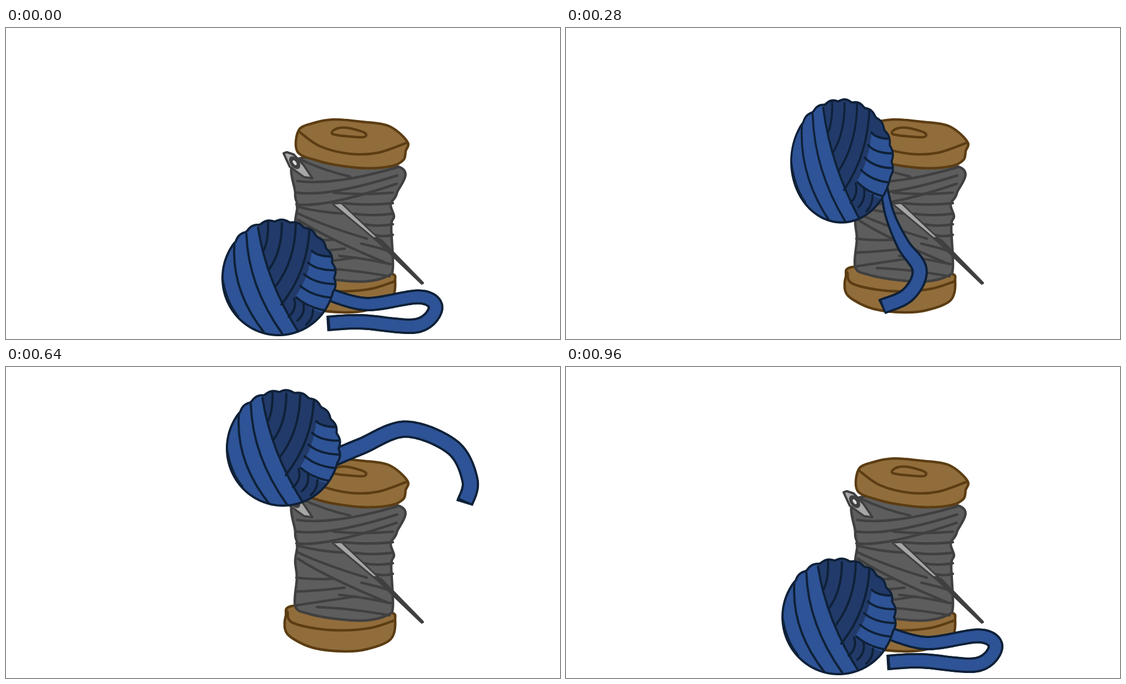
Recreate the animation shown at these times as an HTML page with a canvas. Size 998 px wide and 561 px high, loop 1 s.

```html
<!DOCTYPE html>
<html>
<head>
<meta charset="utf-8">
<style>
html, body { margin: 0; width: 100%; height: 100%; overflow: hidden; background: #fff; }
canvas { display: block; }
</style>
</head>
<body>
<canvas id="stage" width="998" height="561"></canvas>
<script>
const ctx = document.getElementById('stage').getContext('2d');
const LOOP = 1000, STEP = 40, SAMPLES = 80;
const BROWN = '#916d3b', BROWN_INK = '#5c3d13';
const GREY = '#5d5d5d', GREY_INK = '#404040', STEEL = '#a7a7a7';
const BLUE = '#2e5396', NAVY = '#213a69', BLUE_INK = '#0f2138';

const mix = (a, b, k) => a + (b - a) * k;
const points = text => text.split(' ').map(p => p.split(',').map(Number));

// Smooth path through every point
function curve(text, closed) {
  const p = points(text), n = p.length, path = new Path2D();
  const at = i => closed ? p[(i + n) % n] : p[Math.max(0, Math.min(n - 1, i))];
  path.moveTo(...p[0]);
  for (let i = 0; i < (closed ? n : n - 1); i++) {
    const [a, b, c, d] = [at(i - 1), at(i), at(i + 1), at(i + 2)];
    path.bezierCurveTo(b[0] + (c[0] - a[0]) / 6, b[1] + (c[1] - a[1]) / 6,
      c[0] - (d[0] - b[0]) / 6, c[1] - (d[1] - b[1]) / 6, ...c);
  }
  if (closed) path.closePath();
  return path;
}

// Even samples along the same kind of curve
function sample(text) {
  const p = points(text), n = p.length;
  const at = i => p[Math.max(0, Math.min(n - 1, i))];
  return Array.from({ length: SAMPLES + 1 }, (_, s) => {
    const u = s / SAMPLES * (n - 1), i = Math.min(n - 2, Math.floor(u)), k = u - i;
    return [0, 1].map(j => {
      const [a, b, c, d] = [at(i - 1)[j], at(i)[j], at(i + 1)[j], at(i + 2)[j]];
      return b + .5 * k * (c - a + k * (2 * a - 5 * b + 4 * c - d + k * (3 * (b - c) + d - a)));
    });
  });
}

// A family of bent lines: start, bend and end each move by a fixed step [x, y, dx, dy]
function sweep(count, ...knots) {
  const path = new Path2D();
  for (let i = 0; i < count; i++) {
    const [a, b, c] = knots.map(([x, y, dx = 0, dy = 0]) => [x + dx * i, y + dy * i]);
    path.moveTo(...a);
    path.quadraticCurveTo(...b, ...c);
  }
  return path;
}

function paint(path, fill, ink, width = 4.5) {
  if (fill) { ctx.fillStyle = fill; ctx.fill(path); }
  if (ink) { ctx.strokeStyle = ink; ctx.lineWidth = width; ctx.stroke(path); }
}

const spool = {
  base: curve('516,431 504,449 503,474 517,490 555,507 610,513 650,509 693,491 701,455 690,442 610,430', true),
  baseRim: curve('507,441 514,460 560,472 610,475 660,470 700,457'),
  body: curve('530,235 521,298 525,320 521,350 524,380 521,431 545,445 600,455 650,457 688,447 697,431 694,357 699,340 693,318 704,298 707,250', true),
  wraps: [
    sweep(1, [532, 238], [575, 258], [620, 268]),
    sweep(3, [525, 276, -1, 21], [590, 285, -8, 20], [706, 251, -1, 15]),
    sweep(5, [590, 297, 18, 19], [640, 302, 10, 19], [697, 297, 0, 19]),
    sweep(3, [524, 322, 1, 12], [565, 333, 8, 24], [612, 335, 38, 45]),
    sweep(3, [523, 380, 0, 25], [560, 384, 0, 20], [590, 382, 20, 16]),
    sweep(3, [640, 389, -40, 22], [668, 395, -25, 20], [695, 404, -2, 22])
  ],
  top: curve('527,185 552,172 590,165 640,169 690,177 723,205 720,222 716,238 695,249 650,253 600,248 560,239 525,223', true),
  topRim: curve('527,186 565,213 620,227 670,225 722,207'),
  hole: curve('587,188 597,181 615,180 646,189 642,197 595,193', true)
};

const needle = {
  head: new Path2D('M500 226L506 224L518 228L536 247L552 271L537 269L511 250Z'),
  shaft: new Path2D('M588 317L604 316L680 388L668 384Z'),
  tip: new Path2D('M664 379L676 383L751 460L749 461L705 419Z')
};

// Circle with the ends of the yarn bulging out over the top right
function ballEdge() {
  const path = new Path2D();
  for (let d = -140; d < 220; d += 2) {
    const a = d * Math.PI / 180;
    const bump = d < 15 ? 3.5 * Math.abs(Math.sin(11.5 * a)) - 1 : 0;
    path.lineTo(491 + (101 + bump) * Math.cos(a), 451 + (103 + bump) * Math.sin(a));
  }
  path.closePath();
  return path;
}

const ball = {
  edge: ballEdge(),
  left: new Path2D('M454 345V360Q469 458 529 552V570H380V345Z'),
  right: new Path2D('M551 402Q563 414 600 412V515H578Q546 510 522 484Q546 450 551 402Z'),
  seams: [
    sweep(1, [390, 452], [397, 495], [418, 520]),
    sweep(3, [412, 382, 21, -11], [403, 472, 33, -7], [467, 552, 31, 0]),
    sweep(4, [472, 350, 25, 2], [473, 386, 24, 17], [463, 403, 11, 32]),
    sweep(5, [551, 402, -7, 21], [563, 414, -3, 24], [597, 412, 0, 25]),
    sweep(3, [519, 488, 17, 10], [525, 507, 14, 9], [509, 521, 16, 7])
  ]
};

// time, centre height, stretch
const hops = [
  [0, 451, 0], [80, 474, -.22], [120, 451, 0], [200, 335, .13], [360, 147, 0], [480, 96, 0],
  [520, 96, 0], [640, 147, 0], [760, 335, .13], [840, 451, 0], [LOOP, 451, 0]
];

const rest = sample('580,480 650,498 745,485 774,505 740,537 640,530 578,533');
const wide = rest.map(([x, y]) => [mix(585, x, 1.18), y]);
// time, centre line, width at the ball, width at the end
const tails = [
  [0, rest, 25, 28],
  [80, wide, 25, 28],
  [200, sample('568,360 578,430 612,470 668,492 640,525 566,528'), 10, 30],
  [360, sample('575,200 600,290 604,400 571,478'), 19, 28],
  [480, sample('590,122 685,179 727,265 690,321 617,343'), 23, 28],
  [640, sample('590,164 640,143 720,112 805,145 836,205 826,246'), 32, 31],
  [760, sample('562,358 590,346 625,250 629,88'), 30, 28],
  [960, rest, 25, 28],
  [LOOP, rest, 25, 28]
];

function between(keys, t) {
  const i = keys.findIndex(key => key[0] > t);
  const [a, b] = [keys[i - 1], keys[i]];
  return [a, b, (t - a[0]) / (b[0] - a[0])];
}

function drawEye(rx, ry, fill) {
  const path = new Path2D();
  path.ellipse(520, 243, rx, ry, .95, 0, 7);
  paint(path, fill);
}

function drawSpool() {
  paint(spool.base, BROWN, BROWN_INK);
  paint(spool.baseRim, null, BROWN_INK);
  paint(spool.body, GREY, GREY_INK);
  spool.wraps.forEach(w => paint(w, null, GREY_INK));
  paint(needle.head, STEEL, GREY_INK, 4);
  drawEye(13, 8, GREY_INK);
  drawEye(5, 2.5, '#ddd');
  paint(needle.shaft, STEEL, GREY_INK, 3);
  paint(needle.tip, GREY_INK, GREY_INK, 4);
  paint(spool.top, BROWN, BROWN_INK);
  paint(spool.topRim, null, BROWN_INK);
  paint(spool.hole, null, BROWN_INK);
}

function drawTail(t) {
  const [a, b, k] = between(tails, t);
  const line = a[1].map((p, i) => p.map((v, j) => mix(v, b[1][i][j], k)));
  const near = mix(a[2], b[2], k), far = mix(a[3], b[3], k);
  const end = line[SAMPLES];
  const band = (p, ink, inset) => {
    ctx.strokeStyle = ink;
    for (let i = 0; i < p.length - 2; i++) {
      ctx.lineWidth = mix(near, far, Math.min(1, i / SAMPLES * 2)) - inset;
      ctx.beginPath();
      for (let j = 0; j < 3; j++) ctx.lineTo(...p[i + j]);
      ctx.stroke();
    }
  };
  ctx.lineCap = 'butt';
  band(line, BLUE_INK, 0);
  // Leave room for the ink across the free end
  band(line.filter(([x, y]) => Math.hypot(x - end[0], y - end[1]) > 4), BLUE, 8);
  ctx.lineCap = 'round';
}

function drawBall(t) {
  const [a, b, k] = between(hops, t);
  const y = mix(a[1], b[1], k), stretch = mix(a[2], b[2], k);
  ctx.save();
  ctx.translate(491 + (451 - y) / 38, y);
  ctx.scale(1 - 1.55 * stretch, 1 + stretch);
  ctx.translate(-491, -451);
  ctx.save();
  ctx.clip(ball.edge);
  paint(ball.edge, NAVY);
  paint(ball.left, BLUE);
  paint(ball.right, BLUE);
  ball.seams.forEach(s => paint(s, null, BLUE_INK, 4));
  ctx.restore();
  paint(ball.edge, null, BLUE_INK, 4);
  ctx.restore();
}

function frame(now) {
  const t = Math.floor(now % LOOP / STEP) * STEP;
  ctx.fillStyle = '#fff';
  ctx.fillRect(0, 0, 998, 561);
  ctx.lineCap = ctx.lineJoin = 'round';
  drawSpool();
  drawTail(t);
  drawBall(t);
  requestAnimationFrame(frame);
}
frame(performance.now());
</script>
</body>
</html>
```
